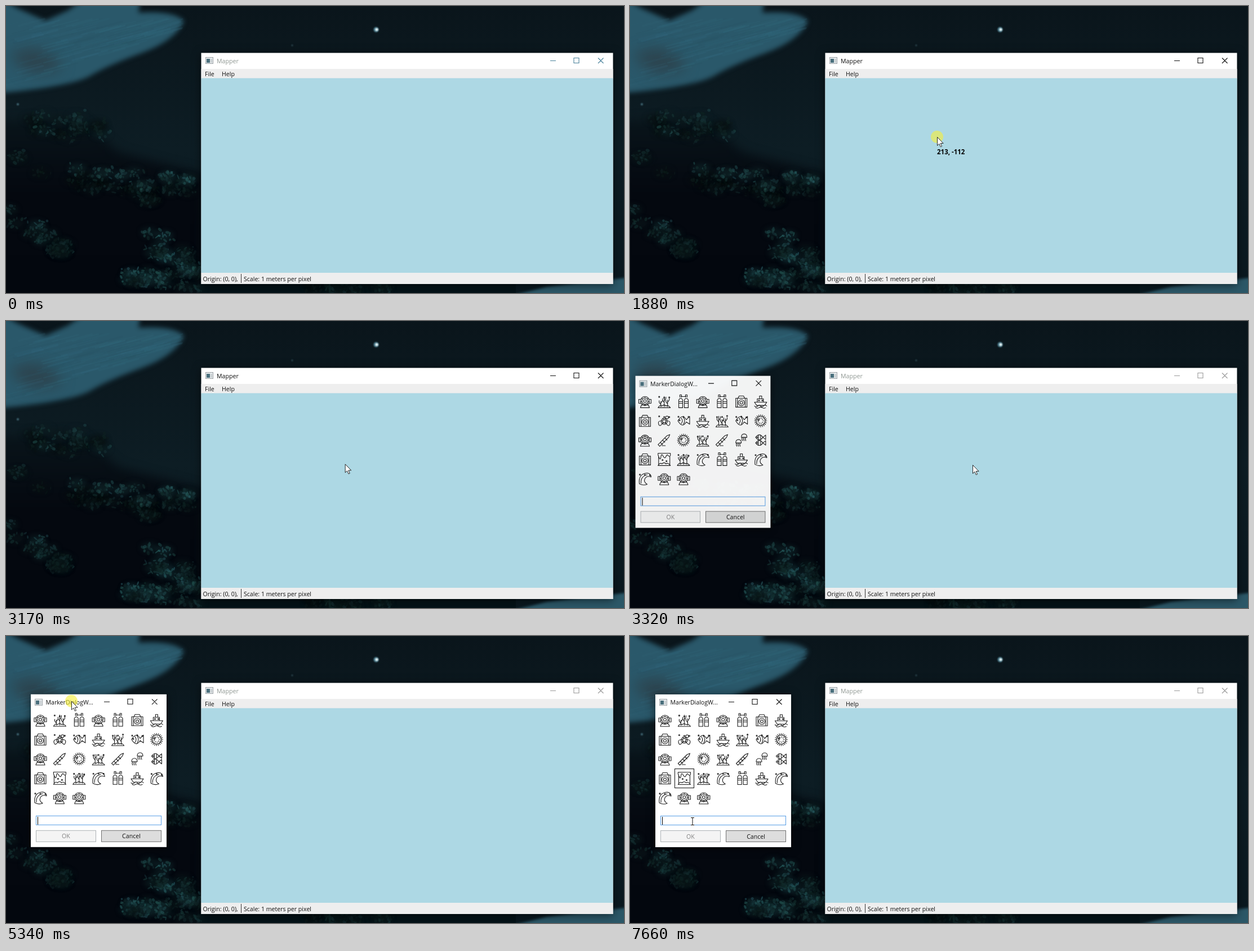
Recreate the animation shown at these times as an HTML page with a canvas. Size 1097 by 511 pixels, loop 8 s.

```html
<!DOCTYPE html>
<html lang="en">
<head>
<meta charset="utf-8">
<title>Mapper</title>
<style>
  html, body { margin: 0; width: 100%; height: 100%; overflow: hidden; background: #08131a; }
  canvas, svg { position: absolute; left: 0; top: 0; width: 1097px; height: 511px; }
  text { font: 10.6px "Open Sans", "Noto Sans", sans-serif; fill: #111; white-space: pre; }
  .frame { filter: drop-shadow(0 2px 8px rgba(0, 0, 0, .55)); }
  .glyph, .icon { fill: none; stroke: #111; stroke-width: 1.1; }
  .icon { stroke: #1c1c1c; stroke-linejoin: round; stroke-linecap: round; }
  .mid { text-anchor: middle; }
  .dim { fill: #838383; }
  #label { font-weight: bold; font-size: 11.5px; fill: #000; }
</style>
</head>
<body>
<canvas id="wall" width="1097" height="511"></canvas>
<svg id="stage" viewBox="0 0 1097 511"></svg>
<script>
const LOOP = 8000;
const $ = id => document.getElementById(id);
const clamp = (v, lo = 0, hi = 1) => Math.max(lo, Math.min(hi, v));
const mix = (a, b, k) => a + (b - a) * k;
const times = (n, make) => Array.from({ length: n }, (_, i) => make(i));

let seed = 7;
function rnd() {
  seed = (seed * 16807) % 2147483647;
  return seed / 2147483647;
}
const spread = r => (rnd() + rnd() - 1) * r;

// ---------- wallpaper ----------
const g = $('wall').getContext('2d');

function fade(stops, height) {
  const f = g.createLinearGradient(0, 0, 0, height);
  stops.forEach((c, i) => f.addColorStop(i / (stops.length - 1), c));
  return f;
}

function blob(path, fill, blur = 0) {
  g.filter = blur ? `blur(${blur}px)` : 'none';
  g.fillStyle = fill;
  g.fill(new Path2D(path));
  g.filter = 'none';
}

function dot(x, y, rx, ry, fill, turn = 0) {
  g.fillStyle = fill;
  g.beginPath();
  g.ellipse(x, y, rx, ry, turn, 0, 7);
  g.fill();
}

function star(x, y, r, color) {
  g.filter = 'blur(1px)';
  dot(x, y, r, r, color);
  g.filter = 'none';
}

// clumps of leaves scattered along the line from a to b
function ridge(ax, ay, bx, by, light) {
  times(16, () => {
    const k = rnd(), x = mix(ax, bx, k) + spread(18), y = mix(ay, by, k) + spread(24);
    const shade = light * (.4 + .8 * rnd());
    g.filter = 'blur(4px)';
    dot(x, y, 16, 9, `hsla(188, 45%, ${shade * .55}%, .6)`);
    g.filter = 'none';
    times(13, () => dot(x + spread(20), y + spread(13), 1.5 + 3 * rnd(), 1 + 2 * rnd(),
      `hsla(${176 + 16 * rnd()}, 42%, ${shade * (.6 + .6 * rnd())}%, .6)`, 3 * rnd()));
  });
}

function drawWall() {
  blob('M0 0H1097V511H0z', fade(['#0a151b', '#0d1d24', '#0a181f'], 511));

  // cloud: a soft body, then brush strokes rising to the right
  blob('M-20-20L20 4 70 26 110 8 150-20H240L235 12Q300 8 316 27 300 62 240 84T150 124 0 154H-20z', '#2a586a', 4);
  blob('M5 88Q45 60 85 90T40 120z', '#2c444f', 12);
  g.lineCap = 'round';
  times(170, () => {
    const x = 270 * rnd(), y = mix(28, mix(145, 45, x / 270), rnd());
    g.strokeStyle = `hsla(196, 42%, ${25 + 13 * rnd()}%, .16)`;
    g.lineWidth = 1 + 3 * rnd();
    g.beginPath();
    g.moveTo(x, y + 6);
    g.lineTo(x + 45, y - 6);
    g.stroke();
  });
  blob('M900 515L960 500 1100 484V515z', '#2c5868', 2);

  blob('M-20 205L130 200 200 260 350 300V530H-20z', fade(['#0b1c22', '#0a171d', '#04080f', '#03070e'], 500), 9);
  blob('M340 495H905V511H340z', '#041217');
  ridge(25, 208, 170, 220, 17);
  ridge(20, 270, 260, 340, 11);
  ridge(120, 285, 340, 325, 21);
  ridge(0, 365, 110, 440, 17);
  ridge(255, 410, 335, 470, 24);
  ridge(210, 485, 340, 490, 20);
  ridge(520, 508, 690, 508, 13);

  star(657, 42, 4.5, '#4d7f90');
  star(658, 42, 2.5, '#f2ffff');
  star(508, 70, 1.5, '#34505a');
  star(21, 175, 2, '#456e7c');
}

// ---------- marker icons: families of shapes on a 24 unit grid around 0,0 ----------
const circ = (x, y, r) => `M${x - r} ${y}a${r} ${r} 0 1 0 ${2 * r} 0a${r} ${r} 0 1 0 ${-2 * r} 0`;
const rect = (x, y, w, h) => `M${x} ${y}h${w}v${h}h${-w}z`;
const rays = (n, a, b) => times(n, i => {
  const q = 2 * Math.PI * i / n, c = Math.cos(q), s = Math.sin(q);
  return `M${c * a} ${s * a}L${c * b} ${s * b}`;
}).join('');
const both = make => make(-1) + make(1);
const bubbles = () => times(3, i => circ(-9 + 9 * i, -9 + 3 * rnd(), 1)).join('');
const SAND = 'M-11 11q3-6 7-3q4-4 7 0q4-3 8 3z';
const WAVES = 'M-11 8q3 3 6 0t5 0t5 0t6 0M-9 11q3 2 6 0t6 0t6 0';

const FAMILY = {
  ring: () => [8, 5.5, 2.5].map(r => circ(0, -1, r)).join('') + rays(8, 6, 7.5) +
    both(s => `M${s * 8}-4h${s * 3}v7h${s * -3}`) + 'M-8 11q1-5 4-5h8q3 0 4 5z',
  coral: () => SAND + [-6, 0, 6].map(x => {
    const h = 9 + 10 * rnd();
    return `M${x} 9v${-h}m0 ${h * .6}l-3-4v-3m3 4l3-4v-3`;
  }).join('') + bubbles(),
  tank: () => both(s => `M${s * 5 - 3.5} 11v-14q3.500-6 7 0v14zm0-8h7m-7-3h7m-5-8v-4h3v4`) + 'M-5-9h10',
  box: () => rect(-10, -6, 20, 16) + 'M-6-6l2-4h8l2 4' + circ(0, 2, 5.5) + circ(0, 2, 2.5) + 'M-7-6v16M7-6v16',
  boat: () => 'M-11 1h22l-4 6h-14z' + rect(-6, -5, 11, 6) + rect(-2, -10, 4, 5) + both(s => circ(s * 3, -2, 1)) + WAVES,
  fish: () => 'M-10 0q8-14 15-2l6-6v14l-6-4q-7 12-15-2M-4-5q4 5 0 10M0-6q4 6 0 12' + circ(-7, -1, 1) + bubbles(),
  pair: () => both(s => `M-9 ${s * 5}q7-9 13 0l5-4v8l-5-4q-6 9-13 0m5-4v8m4-8v8` + circ(-6, s * 5, .8)),
  puffer: () => circ(0, 0, 8) + circ(-4, -2, 1.6) + rays(20, 8, 11) + rays(9, 4, 5.5),
  turtle: () => circ(0, 1, 5.5) + circ(0, 1, 3) + circ(5, -6, 2.5) + rays(6, 3, 5.5) +
    both(s => `M${s * 5} 0q${s * 7} 0 ${s * 5} 6t${s * -7}-2`) + bubbles(),
  rod: () => 'M-11 8L5-8l5-2-2 5L-8 11zM-7 4l4 4M-3 0l4 4M1-4l4 4M-4 10h6',
  jelly: () => both(s => `M${s * 5 - 5} ${-s * 5}q0-6 5-6t5 6z` +
    times(3, i => `M${s * 5 - 3 + 3 * i} ${-s * 5}q-2 3 0 6`).join('')),
  cave: () => 'M-11-11h22v4q-2 3-4 0t-4 2-5-1-4 2-5-4zM-10-6v15M10-6v15' + SAND + circ(-3, 1, 1) + circ(4, 3, 1),
  curl: () => 'M-10 9Q-12-9 4-10 11-9 11-3 3-6 0 0T4 10M-7 8Q-8-4 4-7M-10 9q7 4 14 1' + bubbles()
};
const SET = ('ring coral tank ring tank box boat box turtle fish boat coral fish puffer ring rod puffer ' +
  'coral rod jelly pair box cave coral curl tank boat curl curl ring ring').split(' ');

// ---------- windows ----------
const T = (x, y, s, attr = '') => `<text x="${x}" y="${y}" ${attr}>${s}</text>`;
const R = (x, y, w, h, fill, attr = '') =>
  `<rect x="${x}" y="${y}" width="${w}" height="${h}" fill="${fill}" ${attr}/>`;
const edged = (x, y, w, h, fill, line, attr = '') =>
  R(x + .5, y + .5, w - 1, h - 1, fill, `stroke="${line}" ${attr}`);
const appIcon = (x, y) => edged(x, y, 14, 12, '#e8ecee', '#9aa0a4') +
  R(x + 2, y + 3, 6, 7, '#4a6f7c') + R(x + 9, y + 3, 3, 7, '#c9d0d3');
const buttons = (x, y) => `<path class="glyph" d="M${x} ${y + .5}h10m32-5h9v9h-9zm43 0l9.500 9.500m0-9.500l-9.500 9.500"/>`;

const mainWindow = `<g id="main">
  ${R(346.5, 83.5, 731, 411.5, '#fff', 'class="frame"')}
  ${appIcon(354, 91)}${T(374, 101.5, 'Mapper', 'id="title"')}${buttons(966, 97)}
  ${R(346.5, 112, 731, 17, '#eee')}${T(353, 125, 'File')}${T(383, 125, 'Help')}
  ${R(346.5, 128.5, 731, 346.5, '#add8e4')}
  ${R(346.5, 475, 731, 20, '#eee')}${T(349.5, 489.5, 'Origin: (0, 0),')}
  ${R(417, 477, 1, 16, '#333')}${T(422, 489.5, 'Scale: 1 meters per pixel')}
</g>`;

const menu = `<g id="menu">
  ${R(551, 239, 149, 63, '#000', 'opacity=".45"')}
  ${edged(545, 233, 152, 67, '#f2f2f2', '#999')}
  ${R(574, 236, 1, 61, '#dcdcdc')}
  ${edged(549, 236, 145, 21, '#c4dfec', '#26a0da', 'id="hover"')}
  ${T(582, 251, 'Add Marker...')}${T(582, 271.5, 'Measure')}${T(582, 292, 'Marker', 'class="dim"')}
  <path d="M684 284.5v7l4-3.5z" fill="#555"/>
</g>`;

const iconGrid = SET.map((kind, i) => {
  const x = 17 + 34.4 * (i % 7), y = 46 + 34.5 * Math.floor(i / 7);
  return `<path class="icon" transform="translate(${x} ${y})" d="${FAMILY[kind]()}"/>`;
}).join('');

const dialog = `<g id="dialog">
  ${R(0, 0, 241, 272, '#fff', 'class="frame"')}
  ${appIcon(7, 8)}${T(26.5, 18, 'MarkerDialogW...')}${buttons(130, 13)}
  ${iconGrid}
  ${edged(34, 132, 35, 35, 'none', '#111', 'id="picked"')}
  ${edged(9, 216, 223, 17, '#fff', '#569de5')}
  ${R(12, 218, 1, 14, '#000', 'id="caret"')}
  ${edged(9, 242, 107, 21, '#f4f4f4', '#adb2b5')}${T(62.5, 256.5, 'OK', 'class="mid dim"')}
  ${edged(125, 242, 107, 21, '#ddd', '#707070')}${T(178.5, 256.5, 'Cancel', 'class="mid"')}
</g>`;

const pointer = `${T(0, 0, '', 'id="label"')}
<g id="pointer">
  <circle id="press" r="11" fill="#f6ef3c"/>
  <path id="arrow" d="M.5.5v15l3.4-3.1 2.4 5.4 2.3-1-2.4-5.3h4.9z" fill="#fff" stroke="#111" stroke-width=".9"/>
  <path id="beam" d="M-1-5.500h6m-3 0v13m-3 0h6" fill="none" stroke="#111"/>
</g>`;

// ---------- timeline ----------
const ENTRY = [997, 511];
// start, end, x, y
const MOVES = [
  [400, 910, 631, 249],
  [1190, 1420, 545, 233],
  [2200, 2640, 592, 252],
  [3000, 3300, 608, 256],
  [3650, 3960, 463, 243],
  [4110, 4800, 86, 128],
  [4930, 5040, 81, 109],
  [5080, 5370, 117, 116],
  [5480, 5720, 150, 161],
  [5770, 6130, 187, 212],
  [6130, 6540, 147, 248],
  [6590, 6830, 96, 252],
  [7020, 7380, 109, 329]
];
const ACTIVATE = 1880, MENU = 2090, CHOOSE = 3000, OPEN = 3220, GRAB = 5080, DROP = 5370, PICK = 6880;
const PRESSES = [[ACTIVATE, 2040], [2820, 2940], [5040, 5440], [PICK, 6980], [7430, 7560]];

function pointerAt(t) {
  return MOVES.reduce(([x, y], [from, to, nx, ny]) => {
    const k = clamp((t - from) / (to - from)), e = k * k * (3 - 2 * k);
    return [mix(x, nx, e), mix(y, ny, e)];
  }, ENTRY);
}

const show = (id, on) => $(id).style.display = on ? '' : 'none';

function render(t) {
  const [x, y] = pointerAt(t);

  const active = t >= ACTIVATE && t < OPEN;
  $('title').style.fill = active ? '#111' : '#8f9792';
  $('main').querySelector('.glyph').style.stroke = active ? '#111' : t < ACTIVATE ? '#47809a' : '#999';

  show('menu', t >= MENU && t < CHOOSE);
  $('menu').style.opacity = clamp((t - MENU) / 150);
  show('hover', x > 549 && y > 236 && y < 257);

  const open = 1 - (1 - clamp((t - OPEN) / 160)) ** 3;
  const [gx, gy] = pointerAt(GRAB), [hx, hy] = pointerAt(clamp(t, GRAB, DROP));
  show('dialog', open > 0);
  $('dialog').style.opacity = open;
  $('dialog').setAttribute('transform',
    `translate(${129.5 + hx - gx} ${233 + hy - gy}) scale(${mix(.9, 1, open)}) translate(-120.5 -136)`);
  show('picked', t >= PICK);
  show('caret', t >= 7350 || Math.floor((t - 3150) / 525) % 2 === 0);

  show('label', t >= 400 && t < MENU && y < 475);
  $('label').setAttribute('x', x);
  $('label').setAttribute('y', y + 31);
  $('label').textContent = `${Math.round((x - 347) * 1.076)}, ${-Math.round((y - 128) * 1.067)}`;

  const typing = t > PICK && y > 320;
  show('pointer', t >= 400);
  show('arrow', !typing);
  show('beam', typing);
  $('pointer').setAttribute('transform', `translate(${x} ${y})`);
  const glows = PRESSES.map(([from, to]) => t < from ? 0 : clamp(1 - (t - to) / 90));
  $('press').style.opacity = .62 * Math.max(...glows);
}

drawWall();
$('stage').innerHTML = mainWindow + menu + dialog + pointer;
const start = performance.now();
function tick() {
  render((performance.now() - start) % LOOP);
  requestAnimationFrame(tick);
}
tick();
</script>
</body>
</html>
```
